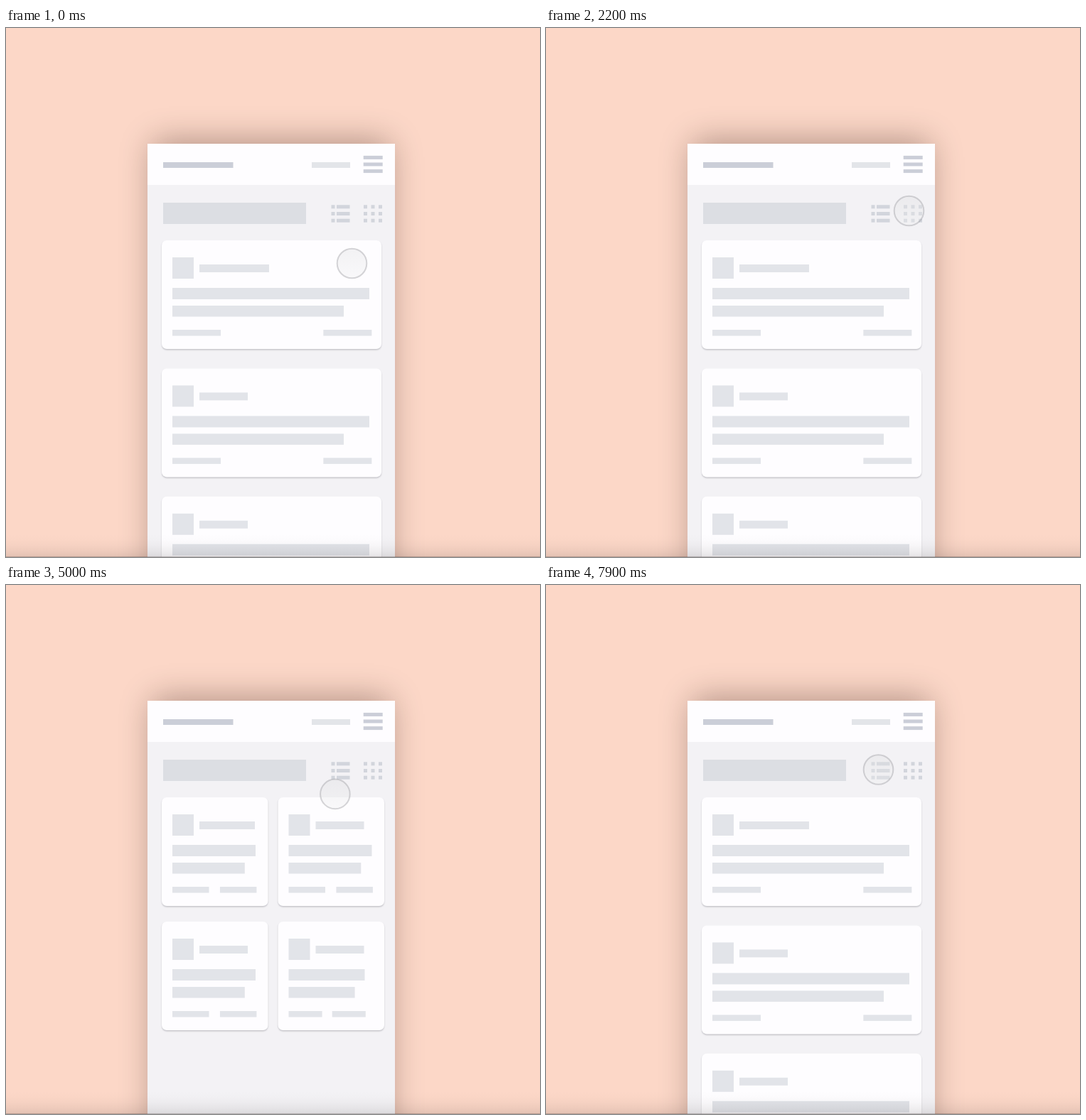
An HTML page with a canvas that plays this animation: 751 px wide and 745 px high, repeating every 8 s.

```html
<!DOCTYPE html>
<html lang="en">
<head>
<meta charset="utf-8">
<title>Card layout prototype</title>
<style>
  html, body { margin: 0; width: 100%; height: 100%; overflow: hidden; background: #fcd7c7; }
  canvas { display: block; width: 751px; height: 745px; }
</style>
</head>
<body>
<canvas id="stage" width="751" height="745"></canvas>
<script>
const ctx = document.getElementById('stage').getContext('2d');
const LOOP = 8000, STEP = 100;
const WHITE = '#fefdff', PAGE = '#f3f2f5', DARK = '#cbced8', ICON = '#d2d5dc',
      BLOCK = '#dcdee3', SOFT = '#e2e4e9', LINE = '#dfe4e8';
const LEFT = 199, TOP = 163, WIDTH = 348;

const TAP = { menu: 1000, close: 1700, grid: 2600, list: 3900,
              gridAgain: 4500, open: 5500, back: 6400, listAgain: 7700 };
const PLACE = { start: [486.5, 331.5], menu: [518, 198], grid: [510.5, 257.5],
                list: [477, 257.5], card: [322, 314], end: [467.5, 260] };

const clamp = v => Math.max(0, Math.min(1, v));
const mix = (a, b, p) => a + (b - a) * p;
const times = (n, paint) => { for (let i = 0; i < n; i++) paint(i); };
const span = (t, from, length) => clamp((t - from) / length);
const ramp = (t, from, length) => 0.5 - 0.5 * Math.cos(Math.PI * span(t, from, length));
const cubicOut = u => 1 - (1 - u) ** 3;
const zigzag = i => 2 - Math.abs(2 - i % 4);

function rect(x, y, w, h, color) {
  ctx.fillStyle = color;
  ctx.fillRect(x, y, w, h);
}

function withAlpha(alpha, paint) {
  if (alpha <= 0) return;
  ctx.save();
  ctx.globalAlpha *= Math.min(1, alpha);
  paint();
  ctx.restore();
}

function clipped(x, y, w, h, paint) {
  ctx.save();
  ctx.beginPath();
  ctx.rect(x, y, w, h);
  ctx.clip();
  paint();
  ctx.restore();
}

function shadowRect(x, y, w, h, color, shade, blur, dy, radius = 0) {
  ctx.save();
  ctx.shadowColor = shade;
  ctx.shadowBlur = blur;
  ctx.shadowOffsetY = dy;
  ctx.fillStyle = color;
  ctx.beginPath();
  ctx.roundRect(x, y, w, h, radius);
  ctx.fill();
  ctx.restore();
}

// Card geometry: full-width rows, or two columns
const listCard = i => ({ x: 219, y: 299 + 180.4 * i, w: 309, h: 153, name: i ? 68 : 98, text: 277 });
const gridCard = (col, row) => ({
  x: 219 + 163.5 * col, y: 299 + 175 * row, w: 149.5, h: 153,
  name: col + row ? 68 : 78, text: 117 - 10 * col * row
});

const blend = (a, b, p) =>
  Object.fromEntries(Object.keys(a).map(k => [k, mix(a[k], b[k], p)]));

const cardBox = ({ x, y, w, h }, radius = 7) =>
  shadowRect(x, y, w, h, WHITE, 'rgba(60,60,75,.26)', 2, 1.5, radius);

function cardContent({ x, y, name, text }) {
  const tag = Math.min(68, text * 0.44);
  rect(x + 15, y + 24, 30, 30, SOFT);
  rect(x + 53, y + 34, name, 11, SOFT);
  rect(x + 15, y + 67, text, 16, SOFT);
  rect(x + 15, y + 92, text * 0.87, 15.5, SOFT);
  rect(x + 15, y + 126, tag, 8.5, SOFT);
  rect(x + 15 + text * 1.012 - tag, y + 126, tag, 8.5, SOFT);
}

function card(c) {
  cardBox(c);
  cardContent(c);
}

function toolbar() {
  rect(221, 246, 201, 30, BLOCK);
  times(3, row => {
    const y = 249.3 + row * 9.7;
    rect(457.5, y, 5, 5, ICON);
    rect(465, y, 18.5, 5, ICON);
    times(3, col => rect(503 + col * 10.5, y, 5, 5, ICON));
  });
}

function detailContent() {
  rect(234, 429.5, 98, 8.5, LINE);
  times(8, i => rect(234, 459 + i * 23.4, 277 - 9 * zigzag(i), 16, LINE));
  rect(283, 680, 182.5, 45, '#d0d4db');
  rect(306, 697.5, 141, 11, WHITE);
}

function detail(first, open) {
  const e = Math.min(1, open * 1.1);
  const box = blend(first, { ...first, x: 218.5, y: 242, w: 309.5, h: 540 }, e);
  cardBox(box, 7 * (1 - e));
  clipped(box.x, box.y, box.w, box.h, () => {
    withAlpha(1 - open * 3, () => cardContent(box));
    withAlpha((open - 0.4) * 2.5, detailContent);
    rect(218.5, 242, 309.5 * open * open, 162, SOFT);
    withAlpha((open - 0.3) * 2, () => {
      rect(234, 347, 277, 16, WHITE);
      rect(234, 371.5, 241, 16, WHITE);
    });
  });
}

function cards(grid, open) {
  withAlpha(1 - grid, () => card(listCard(2)));
  withAlpha(1 - open * 1.5, () => card(blend(listCard(1), gridCard(0, 1), grid)));
  const away = 175 * (1 - grid + open);
  times(2, row => {
    const c = gridCard(1, row);
    card({ ...c, x: c.x + away });
  });
  const first = blend(listCard(0), gridCard(0, 0), grid);
  if (open) detail(first, open);
  else card(first);
}

function menuPanel(p) {
  if (!p) return;
  const h = 594 * p;
  rect(LEFT, 221, WIDTH, 540, `rgba(40,45,55,${0.07 * p})`);
  shadowRect(LEFT, TOP, WIDTH, h, '#fbfafc', 'rgba(0,0,0,.2)', 4, 8);
  clipped(LEFT, TOP, WIDTH, h, () => times(4, i => {
    rect(221, 232 + i * 60.9, 307 - 6.5 * zigzag(i), 52, BLOCK);
    rect(223 + i * 45.9, 482, 29.5, 24.5, '#d2d6dc');
  }));
}

function menuIcon(p) {
  const turn = clamp(p * 1.1);
  times(3, i => withAlpha(i === 1 ? 1 - turn * 2 : 1, () => {
    const side = i - 1, w = mix(27, 35, turn);
    ctx.translate(516.2, 192 + side * 9.6 * (1 - turn));
    ctx.rotate(-side * 0.7 * turn);
    rect(-w / 2, -2.5, w, 5, DARK);
  }));
}

function pointerAt(t) {
  let [x, y] = PLACE.start;
  const go = (from, length, [ex, ey], bend = 0) => {
    const u = ramp(t, from, length), arc = 2 * u * (1 - u) * bend;
    const dx = ex - x, dy = ey - y;
    x += dx * u - dy * arc;
    y += dy * u + dx * arc;
  };
  go(400, 400, PLACE.menu);
  go(1800, 400, PLACE.grid);
  go(3100, 500, PLACE.list);
  go(4100, 300, PLACE.grid);
  go(4720, 780, PLACE.card, -0.27);
  go(6500, 1000, PLACE.end);
  return [x, y];
}

function pointer(t) {
  const [x, y] = pointerAt(t);
  const pressed = Object.values(TAP).some(tap => t >= tap && t < tap + 200);
  const r = pressed ? 19.8 : 20.8;
  const fill = ctx.createLinearGradient(0, y - r, 0, y + r);
  fill.addColorStop(0, 'rgba(222,222,224,.36)');
  fill.addColorStop(1, 'rgba(240,240,241,.36)');
  ctx.beginPath();
  ctx.arc(x, y, r, 0, Math.PI * 2);
  ctx.fillStyle = fill;
  ctx.fill();
  ctx.lineWidth = 2;
  ctx.strokeStyle = 'rgba(150,150,156,.39)';
  ctx.stroke();
}

function bottomShade() {
  const g = ctx.createLinearGradient(0, 712, 0, 745);
  times(5, i => g.addColorStop(i / 4, `rgba(30,20,20,${0.11 * (i / 4) ** 2})`));
  rect(0, 712, 751, 33, g);
  rect(0, 744, 751, 1, 'rgba(60,45,45,.25)');
}

function draw(t) {
  const grid = ramp(t, TAP.grid - 100, 500) - (t >= TAP.list)
             + ramp(t, TAP.gridAgain - 100, 500) - ramp(t, TAP.listAgain - 100, 300);
  const open = ramp(t, TAP.open - 100, 500) - ramp(t, TAP.back + 100, 600);
  const menu = cubicOut(span(t, TAP.menu - 100, 500)) - ramp(t, TAP.close - 100, 500);

  rect(0, 0, 751, 745, '#fcd7c7');
  shadowRect(LEFT + 8, TOP, WIDTH - 16, 680, PAGE, 'rgba(45,22,15,.38)', 44, -3);

  clipped(LEFT, TOP, WIDTH, 582, () => {
    rect(LEFT, TOP, WIDTH, 582, PAGE);
    rect(LEFT, TOP, WIDTH, 58, WHITE);
    rect(430, 189, 54, 8, '#e3e5e9');
    withAlpha(1 - open * 1.5, toolbar);
    cards(grid, open);
    menuPanel(menu);
    rect(221, 189, 98.5, 8, DARK);
    menuIcon(menu);
  });
  bottomShade();
  pointer(t);
}

const start = performance.now();
function tick() {
  const t = (performance.now() - start) % LOOP;
  draw(Math.floor(t / STEP) * STEP);
  requestAnimationFrame(tick);
}
tick();
</script>
</body>
</html>
```
